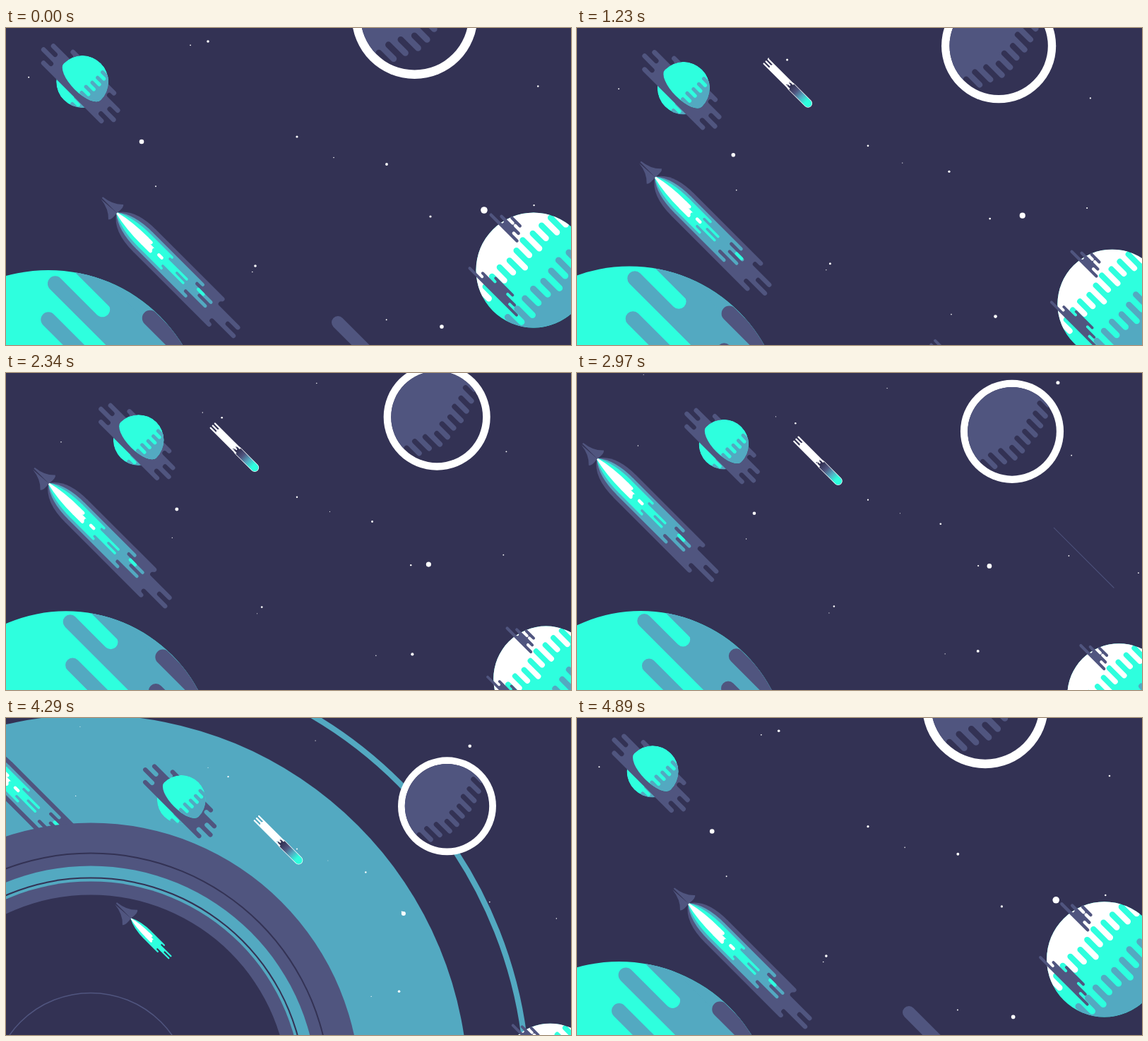
An HTML page with a canvas for the animation above (4.92 s loop, 800 by 449 pixels).

```html
<!DOCTYPE html>
<html lang="en">
<head>
<meta charset="utf-8">
<title>Space loop</title>
<style>
  html, body { margin: 0; height: 100%; overflow: hidden; background: #333254; }
  canvas { display: block; width: 100vw; height: 100vh; }
</style>
</head>
<body>
<canvas width="800" height="449"></canvas>
<script>
const ctx = document.querySelector('canvas').getContext('2d');
const NIGHT = '#333254', PURPLE = '#50557f', TEAL = '#53a9c1', CYAN = '#2effde', WHITE = '#fff';
const LOOP = 4920, TRAVEL = 3900, WIPE = 4290, WIPE_SPEED = 1.6;
const WIPE_CENTER = [120, 530], VANISHING = [412, 302];

const clamp = v => Math.max(0, Math.min(1, v));
const rows = (n, fn) => Array.from({ length: n }, (_, i) => fn(i));
const noise = i => { const s = Math.sin(i * 12.9898) * 43758.5453; return s - Math.floor(s); };

// Progress along the trip; a positive bend starts fast, a negative one starts slowly
const travel = (t, bend) => { const k = t / TRAVEL; return k + bend * k * (1 - k); };
const grow = (t, ms) => 1 - (1 - clamp((t + 630) / ms)) ** 3;

// x, y, size at both ends of each trip
const BODIES = [
  { draw: giantPlanet, from: [60, 566, 1], to: [97, 542, .9], bend: .3, birth: 895 },
  { draw: moon, from: [578.5, -17, 1], to: [622.5, 112.5, .79], bend: .5, bendY: .05 },
  { draw: stripedPlanet, from: [747, 343, 1], to: [770, 490, .88], bend: .7, bendY: .05 },
  { draw: ringedPlanet, from: [108, 76, 1.08], to: [236.5, 111, .96], bend: .08, bendY: -.25, birth: 1000 },
  { draw: comet, from: [308, 86, 1], to: [400, 186, 1], bend: -.5 },
  { draw: rocket, from: [157, 262, 1], to: [-23, 65, 1], bend: -.27 }
];

// x, y, radius
const BRIGHT_STARS = [
  [286, 19, 1.8], [192, 161, 3.3], [412, 154, 1.6], [539, 193, 1.9], [677, 258, 4.8],
  [601, 267, 1.6], [353, 337, 1.8], [617, 423, 2.8], [788, -101, 3.6]
];
const FAINT_STARS = rows(14, i => [noise(i + 1) * 1100 - 150, noise(i + 40) * 670 - 120, .7 + noise(i + 80) * .7]);

// Discs of the closing wipe, outside in
const BANDS = [[380, PURPLE], [338, NIGHT], [336, PURPLE], [319, TEAL], [303, NIGHT], [301, TEAL], [297, PURPLE]];

function disc(x, y, r, color) {
  ctx.fillStyle = color;
  ctx.beginPath();
  ctx.arc(x, y, Math.max(0, r), 0, 7);
  ctx.fill();
}

function ring(r, width, color) {
  if (r <= 0) return;
  ctx.strokeStyle = color;
  ctx.lineWidth = width;
  ctx.beginPath();
  ctx.arc(...WIPE_CENTER, r, 0, 7);
  ctx.stroke();
}

function pill(x0, x1, y, width, color) {
  ctx.strokeStyle = color;
  ctx.lineWidth = width;
  ctx.lineCap = 'round';
  ctx.beginPath();
  ctx.moveTo(x0, y);
  ctx.lineTo(x1, y);
  ctx.stroke();
}

// Row ends of a ragged edge: every second row is a notch
const fingers = (n, tip, notch, { bulge = 0, tilt = 0, jitter = 0 } = {}) => rows(n, i =>
  tip + tilt * i + bulge * Math.sin(Math.PI * i / (n - 1)) + (i % 2) * notch + jitter * (noise(i + n) - .5));

// Block of rows with rounded fingers and notches; a plain number is a flat end
function comb(top, pitch, left, right, color) {
  const n = left.length || right.length, h = pitch / 2, q = Math.PI / 2;
  ctx.fillStyle = color;
  ctx.beginPath();
  for (let i = 0; i < n; i++) {
    const y = top + i * pitch;
    if (left.length) ctx.arc(left[i], y + h, h, -q, q, i % 2 === 0);
    else { ctx.lineTo(left, y); ctx.lineTo(left, y + pitch); }
  }
  for (let i = n - 1; i >= 0; i--) {
    const y = top + i * pitch;
    if (right.length) ctx.arc(right[i], y + h, h, q, -q, i % 2 === 0);
    else { ctx.lineTo(right, y + pitch); ctx.lineTo(right, y); }
  }
  ctx.fill();
}

// Local x axis points down and right
function place(x, y, scale, draw) {
  if (scale <= 0) return;
  ctx.save();
  ctx.translate(x, y);
  ctx.rotate(Math.PI / 4);
  ctx.scale(scale, scale);
  draw();
  ctx.restore();
}

function clipped(shape, draw) {
  ctx.save();
  ctx.beginPath();
  shape();
  ctx.clip();
  draw();
  ctx.restore();
}

const round = r => () => ctx.arc(0, 0, r, 0, 7);

// Stars are drawn in towards one point, large ones faster
function stars(t) {
  const p = travel(t, .5), [cx, cy] = VANISHING;
  for (const [x, y, r] of [...BRIGHT_STARS, ...FAINT_STARS]) {
    const k = 1 - (.1 + .065 * r) * p;
    disc(cx + (x - cx) * k, cy + (y - cy) * k, r * (1 - .35 * p), WHITE);
  }
}

function giantPlanet(t) {
  const k = clamp(t / TRAVEL);
  const slide = i => 16 * k * (i - 2.5);
  clipped(round(229), () => {
    disc(0, 0, 230, CYAN);
    ctx.fillStyle = TEAL;
    ctx.fillRect(-240, -240, 480, 53);
    comb(-210, 22, rows(8, i => (i % 2 ? 33 * i - 99 : 15 * i - 171) + slide(i)), 240, TEAL);
    pill(-8, 240, -217, 23, PURPLE);
    pill(30 - 15 * k, 240, -173, 22, PURPLE);
  });
}

function moon() {
  disc(0, 0, 89, WHITE);
  disc(0, 0, 76.5, NIGHT);
  clipped(round(76.5), () =>
    comb(-81.4, 8.8, -90, fingers(19, 13, -20, { bulge: 24, jitter: 8 }), PURPLE));
}

function stripedPlanet() {
  clipped(round(81.5), () => {
    disc(0, 0, 82, CYAN);
    comb(-82.2, 8.4, -90, fingers(20, -16, -20, { jitter: 10 }), WHITE);
    comb(-93.5, 9, fingers(21, 19, 21, { jitter: 8 }), 90, TEAL);
  });
  comb(-33, 4.5, fingers(5, -74, 12, { tilt: -6 }), fingers(5, -58, -8, { tilt: 3 }), PURPLE);
  comb(44, 4, fingers(5, -30, 12, { tilt: -9 }), fingers(5, 4, -12, { tilt: 6 }), PURPLE);
}

function ringedPlanet() {
  const surface = () => {
    disc(0, 0, 36, CYAN);
    comb(-41.6, 5.05, fingers(16, 10, 9, { jitter: 4 }), 40, TEAL);
  };
  clipped(round(36), surface);
  comb(-23, 6.57, fingers(7, -38, 16, { bulge: -22, tilt: -3 }), fingers(7, 42, -14, { bulge: 18, tilt: 2.5 }), PURPLE);
  clipped(() => {
    ctx.arc(0, 0, 36, Math.PI, 0);
    ctx.ellipse(0, 0, 36, 15, 0, 0, Math.PI);
  }, surface);
}

function comet(t) {
  const reach = 84 * clamp(t / 720);
  if (reach < 3) return;
  const mid = Math.max(-reach, -34);
  const glow = ctx.createLinearGradient(mid, 0, 0, 0);
  [NIGHT, PURPLE, TEAL, CYAN].forEach((color, i) => glow.addColorStop(i * .3, color));
  pill(mid, 0, 0, 12, WHITE);
  pill(mid, 0, 0, 10.6, glow);
  const split = 9 * clamp((t - 720) / 500);
  pill(mid - 10, split - reach + 4, 0, 11 - split / 4, WHITE);
  comb(-5.5, 2.2, fingers(5, -reach, split), fingers(5, mid, -6, { jitter: 8 }), WHITE);
}

function flame(size, half, ends, color) {
  ctx.save();
  ctx.scale(size, size);
  ctx.fillStyle = color;
  ctx.beginPath();
  const bend = 30 - half * .7;
  ctx.moveTo(56, -half);
  ctx.quadraticCurveTo(bend, -half, 0, -1);
  ctx.lineTo(0, 1);
  ctx.quadraticCurveTo(bend, half, 56, half);
  ctx.fill();
  comb(-half, 2 * half / ends.length, 55, ends, color);
  ctx.restore();
}

function rocket(t) {
  const outer = clamp((t + 610) / 480), inner = clamp(.6 + (t + 630) / 900);
  const sway = 8 * Math.cos(t / 400);
  if (outer > 0) {
    flame(outer, 22.5, fingers(7, 192, -22, { bulge: 38 + sway, tilt: 2 }), PURPLE);
    flame(outer, 16.5, fingers(7, 158, -22, { bulge: 24 + sway, tilt: -1 }), TEAL);
  }
  flame(inner, 12.5, fingers(7, 100, -22, { bulge: 34 + sway }), CYAN);
  flame(inner, 7, fingers(3, 64, -6, { bulge: 12, tilt: 4 }), WHITE);
  if (outer === 1) {
    pill(84, 90, 0, 4.5, WHITE);
    pill(158, 168, -5, 4.5, CYAN);
  }
  ctx.fillStyle = PURPLE;
  ctx.beginPath();
  ctx.moveTo(-30, 0);
  for (const side of [-1, 1]) {
    ctx.lineTo(-30, 2 * side);
    ctx.quadraticCurveTo(-12, 4 * side, -2, 15 * side);
    ctx.quadraticCurveTo(2, 13 * side, 0, 0);
  }
  ctx.fill();
}

function drifter(t) {
  const d = Math.max(0, t) * .025;
  place(470 + d, 417 + d, 1, () => {
    if (t < 400) pill(0, 120, 0, 18, PURPLE);
    else comb(-10, 4, fingers(5, 1, 8), fingers(5, 34, -10), PURPLE);
  });
}

function shootingLine(t) {
  const d = t - 2970;
  if (Math.abs(d) < 120) place(675 + d / 4, 219 + d / 4, 1, () => pill(0, 120, 0, 1, PURPLE));
}

function scene(t) {
  stars(t);
  drifter(t);
  shootingLine(t);
  for (const { draw, from, to, bend, bendY = bend, birth } of BODIES) {
    const mix = (i, b) => from[i] + (to[i] - from[i]) * travel(t, b);
    const size = mix(2, .5) * (birth ? grow(t, birth) : 1);
    place(mix(0, bend), mix(1, bendY), size, () => draw(t));
  }
}

function frame(now) {
  const t = now % LOOP, spread = (t - WIPE) * WIPE_SPEED, wiping = t > TRAVEL;
  ctx.fillStyle = NIGHT;
  ctx.fillRect(0, 0, 800, 449);
  if (wiping) {
    ring(spread + 617, 8, TEAL);
    disc(...WIPE_CENTER, spread + 533, TEAL);
  }
  scene(t);
  if (wiping) {
    for (const [r, color] of BANDS) disc(...WIPE_CENTER, spread + r, color);
    const opening = spread + 278;
    if (opening > 0) clipped(() => ctx.arc(...WIPE_CENTER, opening, 0, 7), () => {
      disc(...WIPE_CENTER, opening + 1, NIGHT);
      ring(spread + 139, 1.5, PURPLE);
      scene(t - LOOP);
    });
  }
  requestAnimationFrame(() => frame(performance.now()));
}
frame(0);
</script>
</body>
</html>
```
